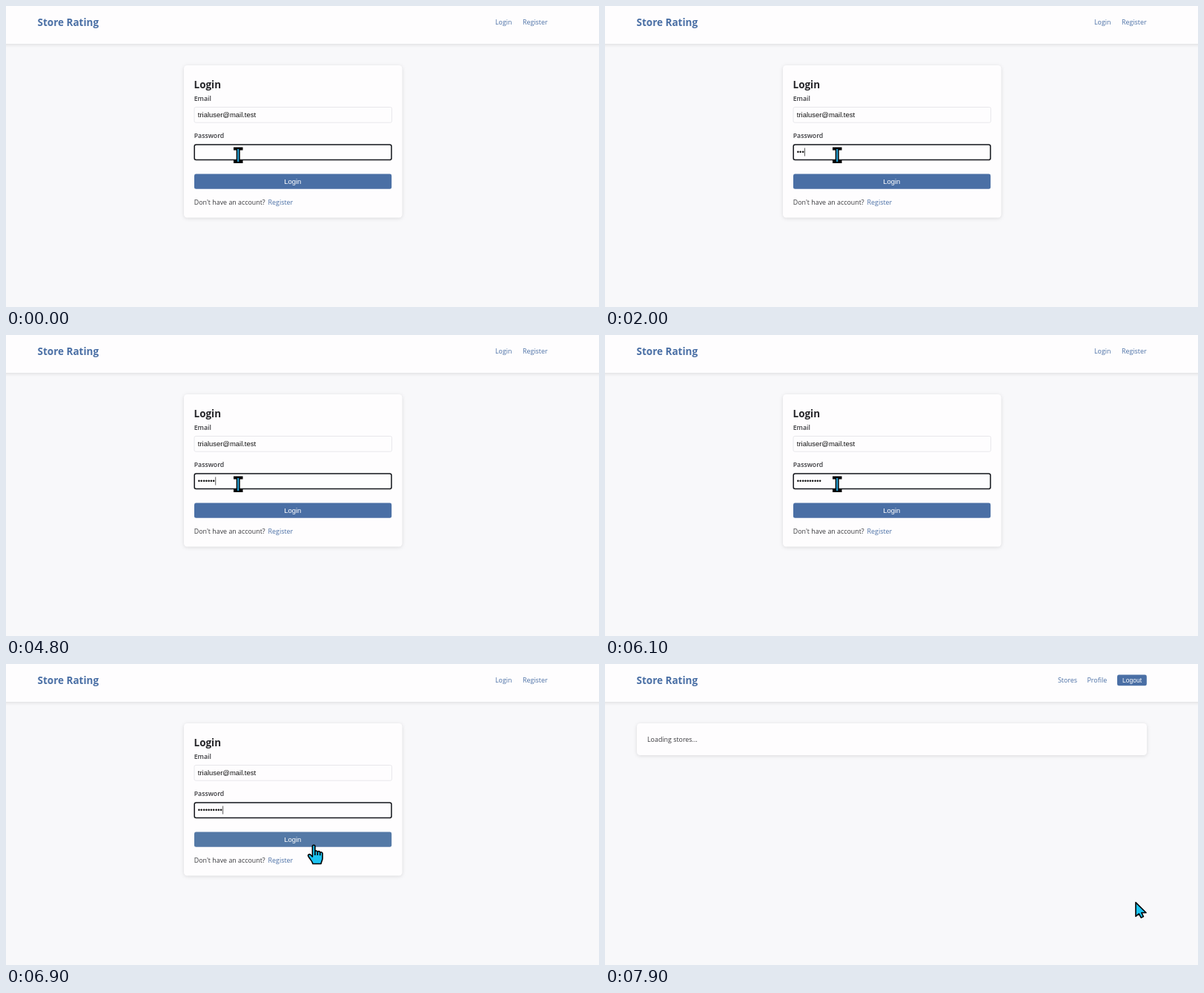
These frames come from a looping animation (800 by 406 pixels, 8 s). An HTML page:

```html
<!DOCTYPE html>
<html lang="en">
<head>
<meta charset="utf-8">
<title>Store Rating</title>
<style>
  html, body { margin: 0; width: 100%; height: 100%; overflow: hidden; background: #f8f8fa; }
  svg { display: block; width: 800px; height: 406px; }
  text { font: 8.9px "Open Sans", sans-serif; fill: #3a3a3e; white-space: pre; }
  .link { fill: #4a6fa5; }
  .brand, .heading { font-size: 13.5px; font-weight: 700; }
  .heading { fill: #26262a; }
  .label { font-size: 8.75px; font-weight: 600; }
  .control { font: 9.45px "Liberation Sans", Arial, sans-serif; fill: #111; }
  .button { fill: #fff; text-anchor: middle; }
  .small { font-size: 8.5px; }
  .panel { fill: #fefdfe; filter: drop-shadow(0 1.2px 2.6px rgba(0, 0, 0, .12)); }
  .field { fill: #fefdfe; stroke: #e3e3e8; stroke-width: .8; }
  .pointer { fill: #1cc4f2; stroke: #000; stroke-width: 1.6; stroke-linejoin: round; }
</style>
</head>
<body>
<svg viewBox="0 0 800 406">
  <rect width="800" height="406" fill="#f8f8fa"/>
  <rect class="panel" x="-10" y="-10" width="820" height="61"/>
  <text class="link brand" x="42.5" y="27">Store Rating</text>

  <g id="loginPage">
    <text class="link" x="660" y="25">Login</text>
    <text class="link" x="697" y="25">Register</text>
    <rect class="panel" x="240" y="80" width="294.5" height="205.5" rx="4.5"/>
    <text class="heading" x="253.5" y="111">Login</text>
    <text class="label" x="253.7" y="128">Email</text>
    <rect class="field" x="254" y="136.5" width="266.5" height="20.7" rx="2"/>
    <text class="control" x="258.8" y="150">trialuser@mail.test</text>
    <text class="label" x="253.7" y="178">Password</text>
    <rect class="field" x="254" y="187" width="266.5" height="20.7" rx="2"/>
    <rect id="focus" x="254.2" y="187" width="265.8" height="20.6" rx="2.4" fill="none" stroke="#15171c" stroke-width="1.5"/>
    <text class="control" id="password" x="258.8" y="200"></text>
    <rect id="caret" y="191.5" width=".8" height="11" fill="#333"/>
    <rect id="button" x="254" y="226.5" width="266.2" height="20.3" rx="2.4"/>
    <text class="control button" id="action" x="386.8" y="240"></text>
    <text x="253.7" y="267.5">Don't have an account?</text>
    <text class="link" x="353.6" y="267.5">Register</text>
  </g>

  <g id="storesPage">
    <text class="link" x="611" y="25">Stores</text>
    <text class="link" x="650.5" y="25">Profile</text>
    <rect x="691" y="14.5" width="39.8" height="14.8" rx="2.4" fill="#4a6fa5"/>
    <text class="control button small" x="711" y="24.8">Logout</text>
    <rect class="panel" x="43" y="80" width="688" height="43" rx="4.5"/>
    <text x="57" y="105">Loading stores...</text>
  </g>

  <g id="beam" fill="none">
    <path d="M-6-8.5H6.5M-6 9H6.5" stroke="#000" stroke-width="4"/>
    <path d="M.2-9V10" stroke="#000" stroke-width="5"/>
    <path d="M.2-8V9" stroke="#259fd2" stroke-width="2.2"/>
  </g>
  <path id="hand" class="pointer" d="M-1.6 1C-1.6-1.4 1.9-1.4 1.9 1V8C2.5 6.4 5 6.6 5.3 8.4C6.3 7 8.4 7.5 8.7 9.2C10 8.2 12 8.8 12 10.8V17C12 20 10.5 21 10 24.5H-1C-1.5 21.5-4.4 19-7 14.7C-8.4 12.2-5.5 10.8-4 12.5L-1.6 15ZM1.9 8V13M5.3 8.6V13M8.7 9.4V13.3"/>
  <path id="arrow" class="pointer" d="M0 .6V19.4L4.3 15.8L7.2 21.2L10.4 19.6L7.8 14.5H14Z"/>
</svg>
<script>
const $ = id => document.getElementById(id);
const show = (id, on) => $(id).style.display = on ? '' : 'none';

const LOOP = 8000, STEP = 100;
const CLICK = 7300, LOADED = 7800;
const keyTimes = [900, 1700, 1900, 2600, 3900, 4300, 4700, 5000, 5200, 5500];
const pointerPath = [[0, 313, 201], [6400, 313, 201], [6800, 415, 245],
  [7200, 415, 245], [7600, 613, 307], [7900, 716, 321]];

function pointerAt(t) {
  const i = pointerPath.findIndex(p => p[0] > t);
  if (i < 0) return pointerPath.at(-1).slice(1);
  const [t0, x0, y0] = pointerPath[i - 1], [t1, x1, y1] = pointerPath[i];
  const k = (t - t0) / (t1 - t0), ease = k * k * (3 - 2 * k);
  return [x0 + (x1 - x0) * ease, y0 + (y1 - y0) * ease];
}

function caretVisible(t, typed) {
  if (t < 1900) return t >= 100;
  return (t - keyTimes[typed - 1]) % 1060 < 530;
}

function draw(t) {
  const typed = keyTimes.filter(k => k <= t).length;
  const focused = t < CLICK;
  show('loginPage', t < LOADED);
  show('storesPage', t >= LOADED);
  show('focus', focused);
  show('caret', focused && caretVisible(t, typed));
  $('password').textContent = '•'.repeat(typed);
  $('caret').setAttribute('x', 259.2 + typed * 3.31);
  $('action').textContent = focused ? 'Login' : 'Logging in...';

  const [x, y] = pointerAt(t);
  const overButton = t < LOADED && x > 254 && x < 520 && y > 226 && y < 247;
  const overField = t < LOADED && x < 520 && y < 208;
  const kind = overField ? 'beam' : overButton ? 'hand' : 'arrow';
  $('button').setAttribute('fill', overButton ? '#5479a6' : '#4a6fa5');
  for (const id of ['beam', 'hand', 'arrow']) show(id, id === kind);
  $(kind).setAttribute('transform', `translate(${x} ${y})`);
}

function tick() {
  const t = performance.now() % LOOP;
  draw(Math.floor(t / STEP) * STEP);
  requestAnimationFrame(tick);
}
tick();
</script>
</body>
</html>
```
